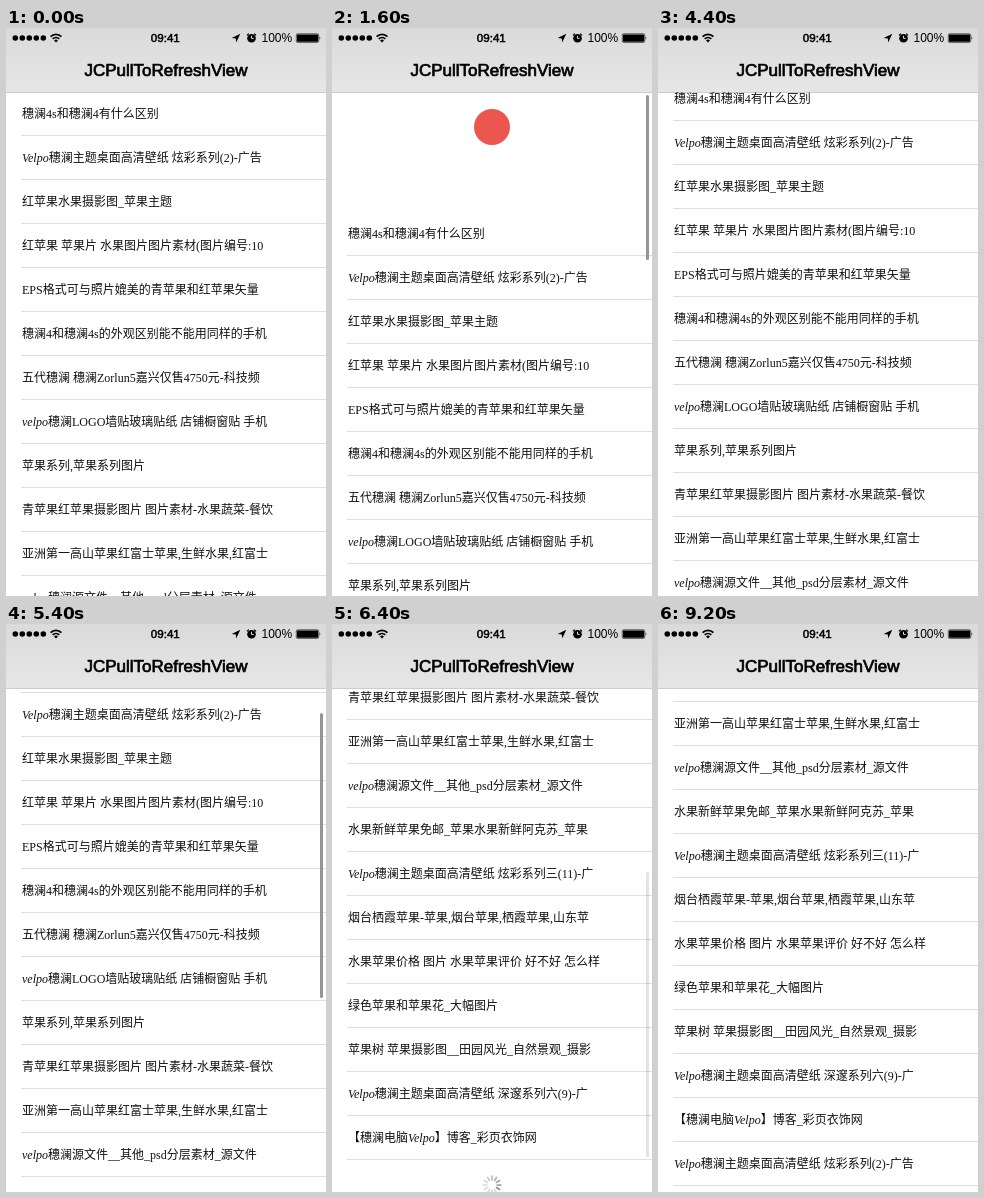
Animation of 320 by 568 pixels, one loop 10000 ms. Source, as an HTML page:

```html
<!DOCTYPE html>
<html lang="zh-CN">
<head>
<meta charset="utf-8">
<title>JCPullToRefreshView</title>
<style>
  html, body { margin: 0; width: 100%; height: 100%; overflow: hidden; background: #fff; }
  #stage { position: relative; width: 320px; height: 568px; overflow: hidden; background: #fff; }
  #stage > *, #spinner { position: absolute; }
  #dot { left: 142px; top: 81px; width: 36px; height: 36px; border-radius: 50%; background: #eb564e; }
  #list { left: 0; top: 64px; width: 320px; }
  .row {
    position: relative; height: 44px; padding-left: 16px; background: #fff; color: #111;
    font: 300 12px/44px "Liberation Serif", "Noto Sans CJK SC", "Noto Sans CJK", serif;
    white-space: pre; overflow: hidden;
  }
  .row::after {
    content: ""; position: absolute; left: 15px; right: 0; bottom: 0; height: 1px; background: #dededf;
  }
  #spinner { left: 150px; top: 895px; }
  #bar { left: 314px; width: 3px; border-radius: 1.5px; background: #959595; }
  #header { left: 0; top: 0; }
  #header text { font-family: "Liberation Sans", Arial, sans-serif; font-size: 12px; }
  #header .medium { text-anchor: middle; stroke: #000; stroke-width: .5px; }
  #header .clock { font-size: 11.6px; }
  #header .title { font-size: 17px; stroke-width: .7px; }
</style>
</head>
<body>
<div id="stage">
  <div id="dot"></div>
  <div id="list">
    <svg id="spinner" width="20" height="20" viewBox="-10 -10 20 20"><g id="spokes"></g></svg>
  </div>
  <div id="bar"></div>
  <svg id="header" width="320" height="65">
    <defs>
      <linearGradient id="shade" x2="0" y2="1">
        <stop stop-color="#dadada"/><stop offset="1" stop-color="#e6e6e6"/>
      </linearGradient>
    </defs>
    <rect width="320" height="64" fill="url(#shade)"/>
    <rect y="64" width="320" height="1" fill-opacity=".2"/>
    <path d="M9.3 10h28.1" stroke="#000" stroke-width="5.6" stroke-linecap="round" stroke-dasharray="0 7"/>
    <g fill="none" stroke="#000">
      <path d="M44.6 8.6a7.6 7.6 0 0 1 10.8 0M46.7 10.9a4.7 4.7 0 0 1 6.6 0" stroke-width="1.8"/>
      <path d="M241 7.4l1.8-1.8M250 7.4l-1.8-1.8" stroke-width="1.3"/>
      <rect x="290.3" y="5.8" width="22.4" height="8.6" rx="1.3" stroke-width=".6"/>
    </g>
    <path d="M50 14.6l-2-2.1a2.8 2.8 0 0 1 4 0z"/>
    <path d="M234.3 5.8l-8.6 4.3 4.1.4.4 4z"/>
    <circle cx="245.5" cy="10.2" r="4.3"/>
    <path d="M245.5 7.8v2.6h2.2" fill="none" stroke="#ddd"/>
    <rect x="291" y="6.5" width="21" height="7.2" rx=".6"/>
    <path d="M313.6 8.3q1.6 1.7 0 3.4z"/>
    <text class="medium clock" x="159.3" y="14.2">09:41</text>
    <text x="255.5" y="14.3">100%</text>
    <text class="medium title" x="160" y="48">JCPullToRefreshView</text>
  </svg>
</div>
<script>
const titles = [
  '穗澜4s和穗澜4有什么区别',
  'Velpo穗澜主题桌面高清壁纸 炫彩系列(2)-广告',
  '红苹果水果摄影图_苹果主题',
  '红苹果 苹果片 水果图片图片素材(图片编号:10',
  'EPS格式可与照片媲美的青苹果和红苹果矢量',
  '穗澜4和穗澜4s的外观区别能不能用同样的手机',
  '五代穗澜 穗澜Zorlun5嘉兴仅售4750元-科技频',
  'velpo穗澜LOGO墙贴玻璃贴纸 店铺橱窗贴 手机',
  '苹果系列,苹果系列图片',
  '青苹果红苹果摄影图片 图片素材-水果蔬菜-餐饮',
  '亚洲第一高山苹果红富士苹果,生鲜水果,红富士',
  'velpo穗澜源文件__其他_psd分层素材_源文件',
  '水果新鲜苹果免邮_苹果水果新鲜阿克苏_苹果',
  'Velpo穗澜主题桌面高清壁纸 炫彩系列三(11)-广',
  '烟台栖霞苹果-苹果,烟台苹果,栖霞苹果,山东苹',
  '水果苹果价格 图片 水果苹果评价 好不好 怎么样',
  '绿色苹果和苹果花_大幅图片',
  '苹果树 苹果摄影图__田园风光_自然景观_摄影',
  'Velpo穗澜主题桌面高清壁纸 深邃系列六(9)-广',
  '【穗澜电脑Velpo】博客_彩页衣饰网'
];
const LOOP = 10000, STEP = 200;
const CONTENT = titles.length * 44, VIEW = 504, TRACK = VIEW - 6;
const END = CONTENT - VIEW, HOLD = 70, FOOTER = 50;

const [dot, list, spinner, spokes, bar] =
  ['dot', 'list', 'spinner', 'spokes', 'bar'].map(id => document.getElementById(id));

list.insertAdjacentHTML('beforeend', [...titles, titles[1]]
  .map(s => `<div class="row">${s.replace(/velpo/gi, '<i>$&</i>')}</div>`).join(''));
const newRow = list.lastElementChild;

spokes.innerHTML = Array.from({ length: 12 }, (_, i) =>
  `<path d="M0-5.2V-8.8" transform="rotate(${-30 * i})" stroke="#66666b" stroke-width="1.7"
    stroke-linecap="round" opacity="${Math.max(.25, .75 - i * .08)}"/>`).join('');

const clamp = x => Math.min(1, Math.max(0, x));
const smooth = x => (x = clamp(x), x * x * (3 - 2 * x));
const spring = s => s < .7 ? Math.exp(-5.1 * s) * Math.cos(10.5 * s) : 0;

// Scroll offset: negative while pulled below the top.
function scrollAt(t) {
  if (t < 1750) return -120 * (1 - (1 - clamp((t - 500) / 1100)) ** 1.5);
  if (t < 4100) return -HOLD - 50 * spring((t - 1750) / 1000);
  if (t < 5205) return -HOLD * spring((t - 4100) / 1000);
  if (t < 6220) return END * smooth((t - 5205) / 975);
  return END + FOOTER * smooth((t - 6220) / 300);
}

function barOpacity(t) {
  if (t > 500 && t < 4000) return 1 - clamp((t - 1750) / 400);
  return t > 5205 ? 1 - clamp((t - 6180) / 300) : 0;
}

function dotScale(t, offset) {
  if (t < 1750 || t > 4100) return clamp(-offset / HOLD);
  const phase = (t - 1800) % 1200 / 600;
  return 1 - .5 * smooth(phase < 1 ? phase : 2 - phase);
}

function render(t) {
  const offset = Math.round(scrollAt(t));
  list.style.transform = `translateY(${-offset}px)`;
  dot.style.transform = `scale(${dotScale(t, offset)})`;

  const inside = Math.min(END, Math.max(0, offset));
  bar.style.top = 67 + inside * TRACK / CONTENT - Math.max(0, offset - END) + 'px';
  bar.style.height = TRACK * VIEW / CONTENT + Math.min(0, offset) + 'px';
  bar.style.opacity = barOpacity(t);

  const loaded = t >= 9200;
  newRow.style.visibility = loaded ? 'visible' : 'hidden';
  spinner.style.visibility = loaded ? 'hidden' : 'visible';
  spokes.setAttribute('transform', `rotate(${Math.floor(t * .012) * 30})`);
}

const start = performance.now();
function tick() {
  const t = (performance.now() - start) % LOOP;
  render(Math.floor(t / STEP) * STEP);
  requestAnimationFrame(tick);
}
tick();
</script>
</body>
</html>
```
